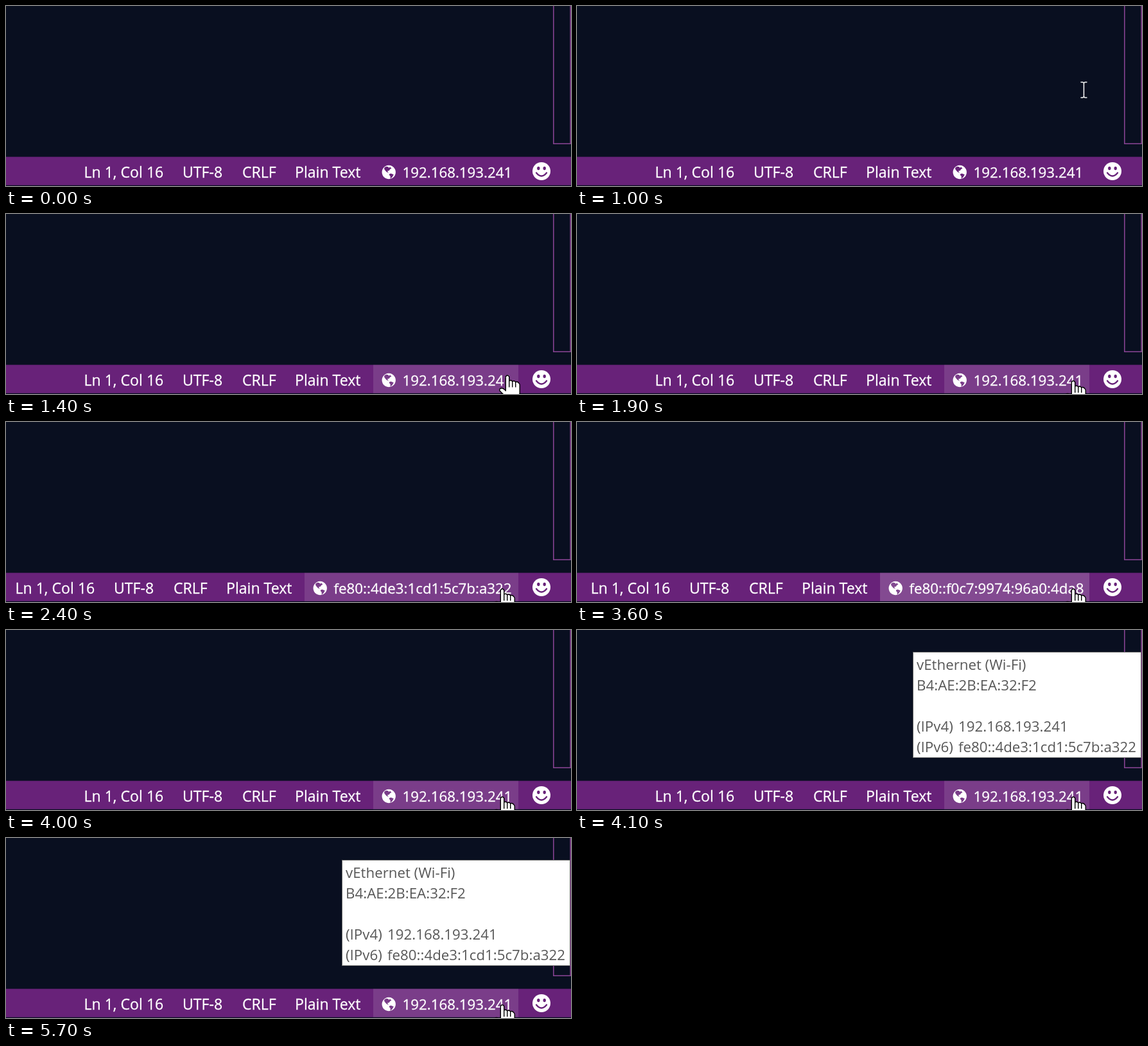
These frames come from a looping animation (880x280 px, 5800 ms). An HTML page:

```html
<!DOCTYPE html>
<html lang="en">
<head>
<meta charset="utf-8">
<style>
  html, body { margin: 0; width: 100%; height: 100%; overflow: hidden; background: #090f20; }
  svg { display: block; font: 22.3px "Open Sans", "Noto Sans", sans-serif; fill: #fff; }
  .bar { fill: #682279; }
  .frame { fill: none; stroke: #8d4597; stroke-width: 1.5; }
  .label { font-size: 23.1px; }
  #items text { stroke: #fff; stroke-width: 0.3; }
  #mouth { fill: none; stroke: #682279; stroke-width: 2.3; stroke-linecap: round; }
  #tooltip rect { stroke: #6b6b6b; }
  #tooltip text { fill: #575757; }
  #hand { stroke: #000; stroke-width: 1.4; stroke-linejoin: round; }
  #beam { fill: none; stroke: #fff; stroke-width: 1.5; }
</style>
</head>
<body>
<svg width="880" height="280" viewBox="0 0 880 280">
  <rect class="frame" x="852.8" y="-5" width="26.400" height="219.200"/>
  <rect class="bar" y="234.600" width="880" height="44.200"/>
  <rect id="hover" y="234.600" height="44.200"/>
  <g id="items">
    <g class="label">
      <text x="121.5" y="267">Ln 1, Col 16</text>
      <text x="275" y="267">UTF-8</text>
      <text x="368" y="267">CRLF</text>
      <text x="450" y="267">Plain Text</text>
    </g>
    <path fill-rule="evenodd" transform="translate(585.5 246.300) scale(1.53)"
      d="M7 1a7 7 0 1 0 .01 0z
         M2.3 3.6L4.2 2.2L6 2.4L7.2 3.6L8.2 2.8L9.8 4L8.2 5L7.4 6.4L5.8 6.6L5.9 7.8L7.2 8.8L5 8L3.4 6.4L2.5 5z
         M7.6 9.8L9.2 9.2L12 10.4L10.6 12.8L8.6 14.6L8.6 12.2L7.4 10.8z"/>
    <text id="address" x="617.5" y="267"></text>
  </g>
  <circle cx="834" cy="257" r="14"/>
  <g class="bar">
    <ellipse cx="829.3" cy="252.5" rx="2.2" ry="2.8"/>
    <ellipse cx="838.7" cy="252.5" rx="2.2" ry="2.8"/>
  </g>
  <path id="mouth" d="M826 259.500q8 10 16 0"/>
  <g id="tooltip">
    <rect x="523.5" y="34.5" width="355" height="164"/>
    <text x="529" y="62">vEthernet (Wi-Fi)</text>
    <text x="529" y="94">B4:AE:2B:EA:32:F2</text>
    <text x="529" y="158">(IPv4)</text>
    <text x="594" y="158">192.168.193.241</text>
    <text x="529" y="190">(IPv6)</text>
    <text x="594" y="190">fe80::4de3:1cd1:5c7b:a322</text>
  </g>
  <path id="beam" d="M-5-12h3.5l1.5 1.5l1.5-1.5h3.5M0-10.5v21M-5 12h3.5l1.5-1.5l1.5 1.5h3.5"/>
  <path id="hand" d="M-2.7 2q2.7-4 5.4 0v6.5q3-2 5 1q3-2 5 1q3-1.5 5 1.5q1.500 1 1.500 3v13q-1 4-3 6v6H0v-4
    l-12-12q-1-4 3-4q3 0 6.300 4z
    M2.700 8.500v10M7.700 9.500v9M12.700 10.500v8"/>
</svg>
<script>
  const LOOP = 5800, STEP = 100;
  const $ = id => document.getElementById(id);
  const addresses = [
    { from: 0, shift: 0, text: "192.168.193.241" },
    { from: 2100, shift: -107, text: "fe80::4de3:1cd1:5c7b:a322" },
    { from: 2800, shift: -100, text: "fe80::f0c7:9974:96a0:4da8" },
    { from: 3700, shift: 0, text: "192.168.193.241" }
  ];
  const pointerPath = [[800, 800, -20], [1400, 781, 251], [1900, 773, 259.5]];

  function pointerAt(t) {
    const next = pointerPath.findIndex(p => p[0] > t);
    if (next === 0) return pointerPath[0].slice(1);
    if (next < 0) return pointerPath.at(-1).slice(1);
    const a = pointerPath[next - 1], b = pointerPath[next];
    const k = (t - a[0]) / (b[0] - a[0]);
    const ease = k * (2 - k);
    return [1, 2].map(i => a[i] + (b[i] - a[i]) * ease);
  }

  const show = (id, visible) => $(id).setAttribute("visibility", visible ? "visible" : "hidden");

  function draw(now) {
    const t = Math.floor(now % LOOP / STEP) * STEP;
    const { shift, text } = addresses.findLast(a => t >= a.from);
    const [x, y] = pointerAt(t);
    const hovering = y >= 235;
    const pressed = addresses.some(a => t === a.from - STEP);

    $("address").textContent = text;
    $("items").setAttribute("transform", `translate(${shift})`);
    $("hover").setAttribute("x", 572 + shift);
    $("hover").setAttribute("width", 226 - shift);
    $("hover").setAttribute("fill-opacity", pressed ? 0.18 : 0.12);
    show("hover", hovering);
    show("hand", hovering);
    show("beam", !hovering);
    show("tooltip", t >= 4100);
    for (const id of ["hand", "beam"]) $(id).setAttribute("transform", `translate(${x} ${y})`);
    requestAnimationFrame(() => draw(performance.now()));
  }
  draw(0);
</script>
</body>
</html>
```
